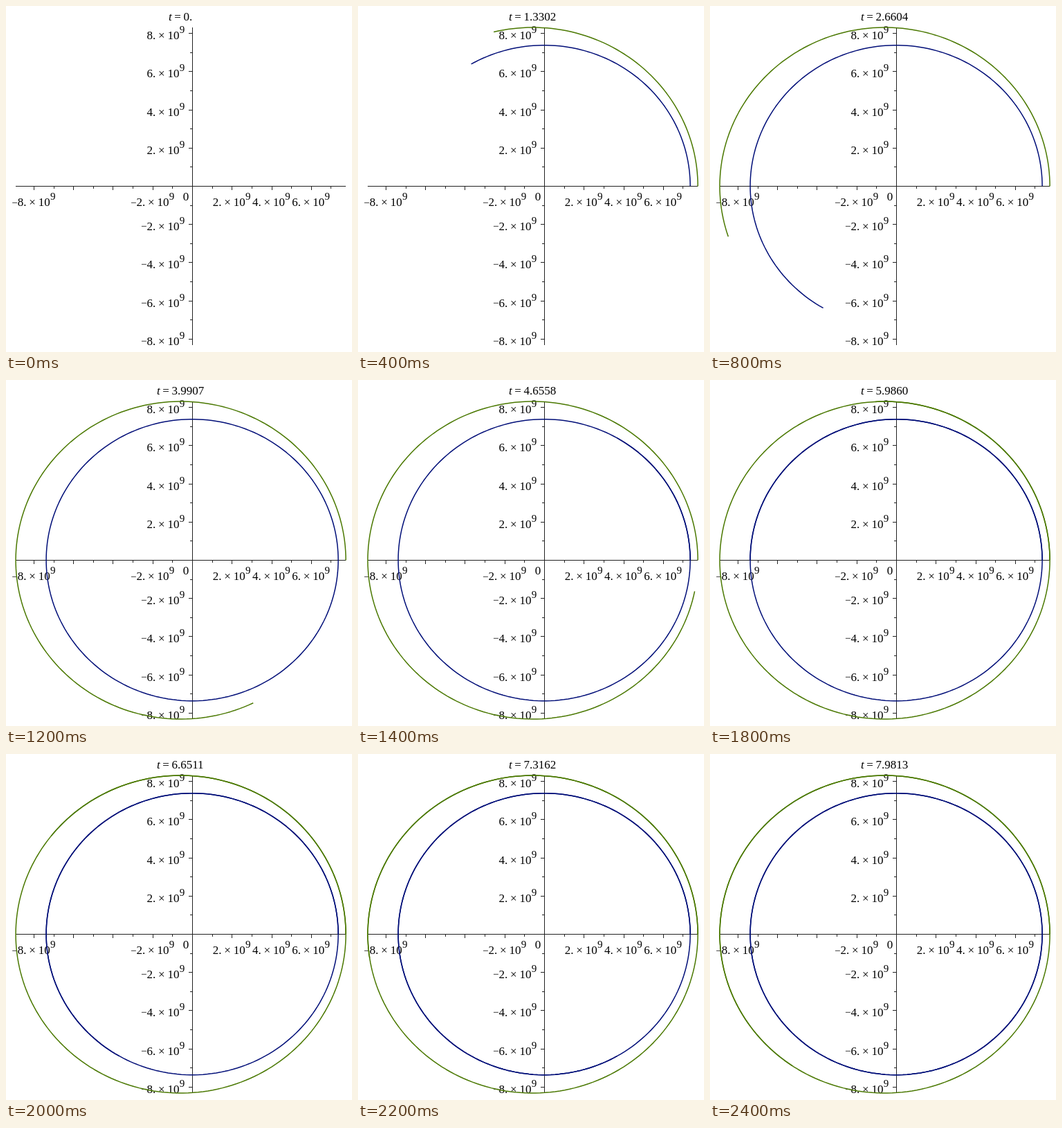
These frames come from a looping animation (500x500 px, 2500 ms). An HTML page:

```html
<!DOCTYPE html>
<html lang="en">
<head>
<meta charset="utf-8">
<title>Two orbits</title>
<style>
  html, body { margin: 0; width: 100%; height: 100%; overflow: hidden; background: #fff; }
  svg { display: block; width: 100vw; height: 100vh; }
  text { font-family: "Liberation Serif", "Times New Roman", serif; font-size: 17px; fill: #000; }
  .small { font-size: 15px; }
  .axis { stroke: #222; stroke-width: 1; fill: none; shape-rendering: crispEdges; }
  .orbit { fill: none; stroke-width: 1.5; stroke-linejoin: round; }
</style>
</head>
<body>
<svg id="stage" viewBox="0 0 500 500"></svg>
<script>
const stage = document.getElementById("stage");
const TAU = 2 * Math.PI;
const STEP_MS = 100, STEPS = 25, TIME_STEP = 0.33255425;
const ORIGIN = { x: 269.5, y: 260.5 };
const UNIT = { x: 28.63, y: 27.6 }; // pixels per 10^9
const DIGIT = 8.5, POINT = 4.25;

function add(tag, attrs, content = "") {
  const node = document.createElementNS("http://www.w3.org/2000/svg", tag);
  for (const key in attrs) node.setAttribute(key, attrs[key]);
  node.textContent = content;
  return stage.appendChild(node);
}

function label(x, y, content, attrs = {}) {
  return add("text", { x, y, ...attrs }, content);
}

// Scientific notation whose mantissa starts at x
function powerLabel(x, y, value) {
  if (value < 0) label(x - 8.5, y - 0.5, "\u2212", { class: "small" });
  label(x, y, Math.abs(value) + ".");
  label(x + 16.5, y, "\u00d7");
  label(x + 30, y, "10");
  label(x + 47.2, y - 9, "9", { class: "small" });
}

const pixelCenter = v => Math.floor(v) + 0.5;

function drawAxes() {
  let d = `M14 ${ORIGIN.y}H491M${ORIGIN.x} 31V490`;
  for (let n = -8; n <= 8; n++) {
    const size = n % 2 ? 3.5 : 5.5;
    const x = pixelCenter(ORIGIN.x + n * UNIT.x);
    const y = pixelCenter(ORIGIN.y - n * UNIT.y);
    if (n < 8) d += `M${x} ${ORIGIN.y}v${size}`;
    if (n) d += `M${ORIGIN.x} ${y}h${-size}`;
    if (n && n % 2 === 0) powerLabel(203.6, y + 8, n);
  }
  add("path", { class: "axis", d });
  for (const n of [-8, -2, 2, 4, 6]) {
    powerLabel(ORIGIN.x + n * UNIT.x - (n < 0 ? 23.7 : 28), 289, n);
  }
  label(255.7, 280.5, "0");
}

function eccentricAnomaly(mean, e) {
  let E = mean;
  for (let i = 0; i < 8; i++) E = mean + e * Math.sin(E);
  return E;
}

// Each lap has its own path so that a repeated lap darkens the line
function makeOrbit({ cx, cy, rx, ry, e, period, color }) {
  const laps = [0, 1].map(() => add("path", { class: "orbit", stroke: color }));
  const point = a => `${(cx + rx * Math.cos(a)).toFixed(2)} ${(cy - ry * Math.sin(a)).toFixed(2)}`;
  return step => {
    const total = eccentricAnomaly(step / period * TAU, e);
    laps.forEach((path, lap) => {
      const sweep = Math.min(TAU, total - lap * TAU);
      if (sweep < 1e-6) return path.setAttribute("d", "");
      const count = Math.ceil(sweep / 0.03);
      const points = Array.from({ length: count + 1 }, (_, i) => point(sweep * i / count));
      path.setAttribute("d", "M" + points.join("L"));
    });
  };
}

drawAxes();
const orbits = [
  { cx: 269.1, cy: 260.2, rx: 211, ry: 203.5, e: 0, period: 12, color: "#000e78" },
  { cx: 252.6, cy: 260.5, rx: 238.5, ry: 229.5, e: 0.069, period: 14.42, color: "#4a7800" }
].map(makeOrbit);

const symbol = label(0, 21, "t", { "font-style": "italic" });
const equals = label(0, 21, "=");
const counter = label(0, 21, "");

function drawTitle(step) {
  const value = step ? (step * TIME_STEP).toPrecision(5) : "0.";
  const width = DIGIT * (value.length - 1) + POINT;
  const left = 252 - (21.5 + width) / 2;
  symbol.setAttribute("x", left);
  equals.setAttribute("x", left + 8.3);
  counter.setAttribute("x", left + 21.5);
  counter.textContent = value;
}

let shown = -1;
function render(ms) {
  const step = Math.floor(ms / STEP_MS) % STEPS;
  if (step === shown) return;
  shown = step;
  drawTitle(step);
  orbits.forEach(draw => draw(step));
}

const start = performance.now();
function tick() {
  render(performance.now() - start);
  requestAnimationFrame(tick);
}
tick();
</script>
</body>
</html>
```
